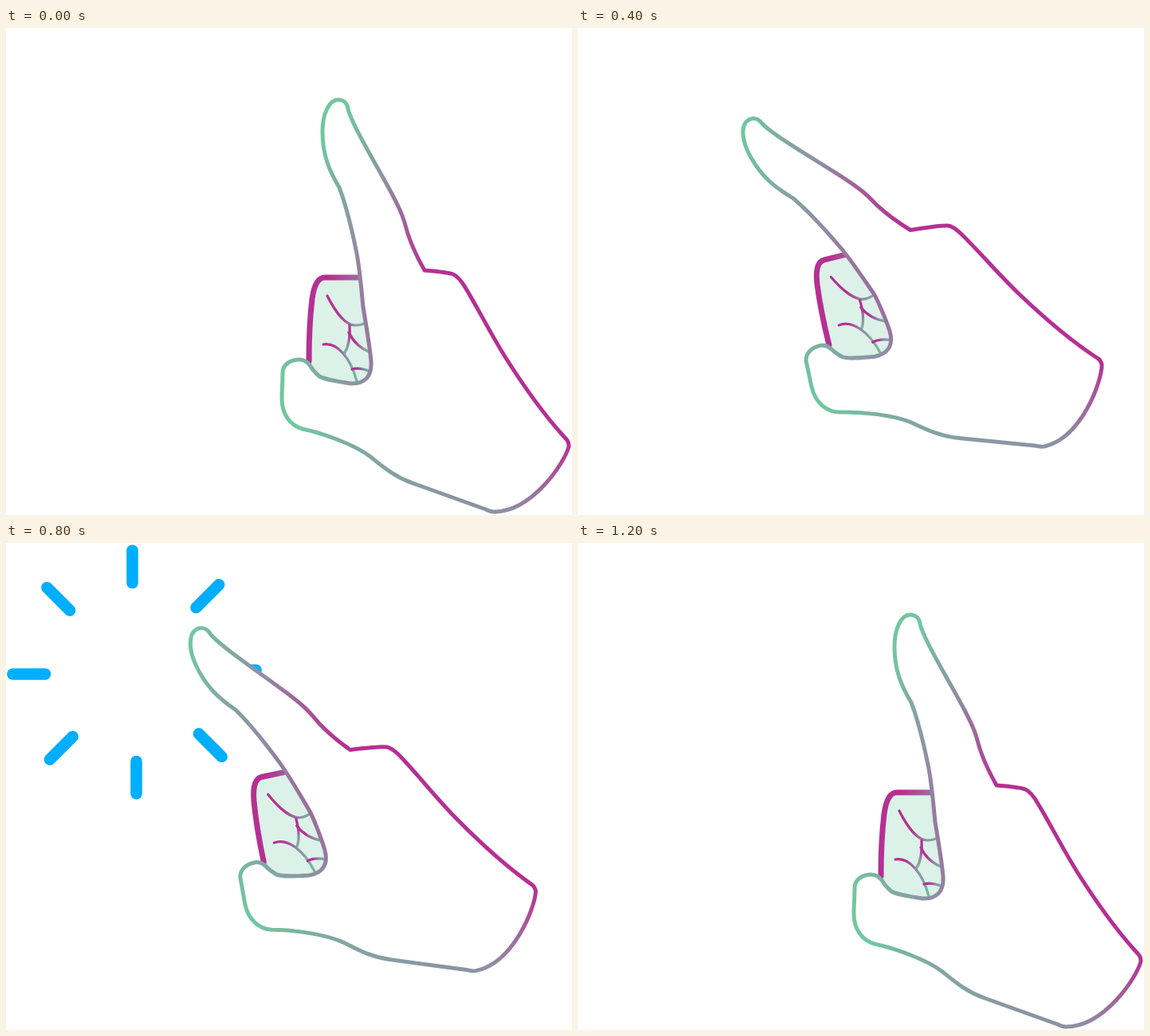
Write an HTML page that moves like this. It is 710 px wide and 611 px high and loops after 1.28 s.

```html
<!DOCTYPE html>
<html lang="en">
<head>
<meta charset="utf-8">
<title>Tapping hand</title>
<style>
  html, body { margin: 0; width: 100%; height: 100%; overflow: hidden; background: #fff; }
  svg { display: block; width: 100vw; height: 100vh; }
  path, line { fill: none; stroke-linecap: round; stroke-linejoin: round; }
</style>
</head>
<body>
<svg viewBox="0 0 710 611">
  <defs>
    <radialGradient id="edge" gradientUnits="userSpaceOnUse">
      <stop offset="0" stop-color="#b53093"/>
      <stop offset=".5" stop-color="#8f8ea4"/>
      <stop offset="1" stop-color="#72c6a0"/>
    </radialGradient>
    <linearGradient id="cuff" gradientUnits="userSpaceOnUse" x1="405" y1="0" x2="465" y2="0">
      <stop offset="0" stop-color="#b53093"/>
      <stop offset="1" stop-color="#8f8ea4"/>
    </linearGradient>
    <linearGradient id="across">
      <stop offset=".3" stop-color="#b53093"/>
      <stop offset=".65" stop-color="#8f8ea4"/>
      <stop offset="1" stop-color="#74b9a0"/>
    </linearGradient>
    <linearGradient id="down" href="#across" x1="0" y1="0" x2="0" y2="1"/>
  </defs>

  <g id="rays" stroke="#00aeff" stroke-width="14.6"></g>

  <g id="fist">
    <path style="fill:#dcf1e7" d="M460,313 H400 C390,313 386,325 384,340 C381,365 380,395 380,418 L395,445 H462 Z"/>
    <path stroke="url(#cuff)" stroke-width="7" d="M450,313 H400 C390,313 386,325 384,340 C381,365 380,395 380,418"/>
    <g stroke="url(#across)" stroke-width="3.2">
      <path d="M403,336 C413,356 426,373 438,373 C444,373 448,372 452,369"/>
      <path stroke="url(#down)" d="M431,373 C432,390 430,400 424,409"/>
      <path d="M430,382 C436,395 445,402 457,407"/>
      <path d="M398,397 C415,394 432,413 440,443"/>
      <path d="M434,428 C441,426 448,427 457,431"/>
    </g>
  </g>

  <path id="hand" style="fill:#fff" stroke="url(#edge)" stroke-width="5"/>
</svg>

<script>
const LOOP = 1280, STEP = 80;
const CENTER = [530, 450], SHIFT = [-88.2, -82.3], KNUCKLE = [519, 346];
const TURN = -20, BEND = -21.3, STRETCH = 0.034;

const FINGER = 'M448,350 C446,330 444,305 440,283 C435,258 428,226 418,200 ' +
  'C406,180 397,160 397,130 C397,108 405,90 417,90 C423,90 428,94 429,101 ' +
  'C432,118 466,174 484,208 C500,238 500,245 504,258 C509,273 517,290 525,304 ';
const PALM = 'C538,305 553,306 561,309 C568,312 573,320 577,327 C595,357 607,382 627,414 ' +
  'C653,455 677,488 703,516 C706,519 706,522 706,525 C701,545 660,607 612,607 ' +
  'C609,607 606,606 602,604 L510,571 C485,562 470,548 456,537 C437,523 400,509 372,503 ' +
  'C357,499 346,485 346,465 C346,455 347,445 347,433 C347,422 357,416 368,416 ' +
  'C374,416 378,419 381,423 C384,428 388,433 393,437 C400,441 412,443 432,446 ' +
  'C450,447 459,437 458,419 C457,404 452,374 ';
const JOINT = '448,350 ';

const $ = id => document.getElementById(id);
const rays = $('rays'), fist = $('fist'), hand = $('hand'), edge = $('edge');
const mix = (a, b, k) => a + (b - a) * k;

function smooth(x) {
  x = Math.min(1, Math.max(0, x));
  return x * x * (3 - 2 * x);
}

function rotate([x, y], [cx, cy], degrees, scale = 1) {
  const angle = degrees * Math.PI / 180;
  const c = Math.cos(angle) * scale, s = Math.sin(angle) * scale;
  const dx = x - cx, dy = y - cy;
  return [cx + dx * c - dy * s, cy + dx * s + dy * c];
}

function mapPath(d, fn) {
  return d.replace(/(\d+),(\d+)/g, (m, x, y) =>
    fn([+x, +y]).map(v => v.toFixed(2)).join(','));
}

function setAll(el, attrs) {
  for (const name in attrs) el.setAttribute(name, attrs[name]);
}

for (let i = 0; i < 8; i++) {
  const ray = document.createElementNS('http://www.w3.org/2000/svg', 'line');
  setAll(ray, { x1: -2.5, x2: -2.5, transform: `translate(161 162) rotate(${i * 45})` });
  rays.append(ray);
}

// 0 = finger raised, 1 = finger pressed
function press(t) {
  if (t < 560) return smooth((t - 70) / 518);
  return t < 600 ? 1 : 1 - smooth((t - 498) / 702);
}

const reach = t => mix(35.5, 152.5, smooth((t - 428) / 351));

function drawHand(k) {
  const palm = p => rotate(p, CENTER, TURN * k).map((v, i) => v + SHIFT[i] * k);
  const finger = p => palm(rotate(p, KNUCKLE, BEND * k, 1 + STRETCH * k));
  hand.setAttribute('d', mapPath(FINGER, finger) + mapPath(PALM, palm) + mapPath(JOINT, finger) + 'Z');
  fist.setAttribute('transform',
    `translate(${SHIFT[0] * k} ${SHIFT[1] * k}) rotate(${TURN * k} ${CENTER.join(' ')})`);
  const cx = mix(697, 597, k), cy = mix(347, 128, k);
  setAll(edge, { cx, cy, fx: cx, fy: cy, fr: mix(175, 248, k), r: mix(360, 451, k) });
}

function drawRays(t) {
  const outer = reach(t), inner = reach(t - 160);
  rays.style.display = outer - inner > 0.1 ? '' : 'none';
  for (const ray of rays.children) setAll(ray, { y1: -inner, y2: -outer });
}

function frame(now) {
  const t = Math.floor((now - start) % LOOP / STEP) * STEP;
  drawHand(press(t));
  drawRays(t);
  requestAnimationFrame(frame);
}

const start = performance.now();
frame(start);
</script>
</body>
</html>
```
